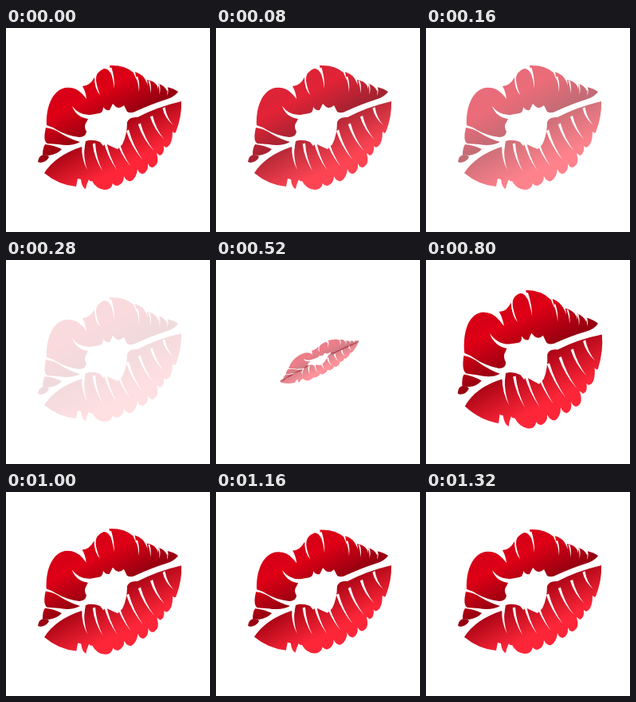
Animation of 256 by 256 pixels, one loop 1.92 s. Source, as an HTML page:

```html
<!DOCTYPE html>
<html lang="en">
<head>
<meta charset="utf-8">
<title>Kiss</title>
<style>
  html, body { margin: 0; width: 100%; height: 100%; overflow: hidden; background: #fff; }
  svg { display: block; width: 100vw; height: 100vh; }
  .cut { fill: #fff; }
</style>
</head>
<body>
<svg viewBox="0 0 256 256">
  <defs>
    <linearGradient id="top" gradientUnits="userSpaceOnUse" x1="128" y1="123" x2="103" y2="75">
      <stop offset="0" stop-color="#960010"/>
      <stop offset=".8" stop-color="#e00016"/>
      <stop offset="1" stop-color="#d80016"/>
    </linearGradient>
    <linearGradient id="low" gradientUnits="userSpaceOnUse" x1="130" y1="126" x2="153" y2="170">
      <stop offset="0" stop-color="#a80414"/>
      <stop offset="1" stop-color="#fc2638"/>
    </linearGradient>
  </defs>
  <g id="mark">
    <g id="lower">
      <path fill="url(#low)" d="M48 182Q62 160 95 149L98 153L100 142Q108 139 118 143L122 148L125 145L133 149L140 152L146 146
        Q152 134 152 118Q155 111 165 112Q190 99 220 92Q221 110 213 131Q211 133 209 130Q209 145 203 149Q200 151 198 148
        Q199 158 193 160L189 157Q193 170 186 174Q181 177 178 170Q179 180 172 183Q167 183 165 177Q164 188 157 192
        Q151 193 148 186Q148 195 140 198Q136 198 134 195Q132 203 124 203Q113 202 108 192Q105 193 104 190
        Q101 196 100 202Q95 200 94 190L90 189L88 199Q66 197 48 182Z"/>
    </g>
    <g id="upper" fill="url(#top)">
      <path d="M51 122C50 101 57 79 74 75Q87 73 96 83L101 89Q100 80 96 73Q105 73 111 62Q111 76 118 84Q114 74 113 66
        Q112 55 123 51Q128 50 132 58L130 47Q149 46 160 56L164 66L162 55Q172 58 176 67L178 72L177 65Q186 66 190 73
        L191 77L191 70Q199 72 202 79L202 74Q211 76 216 80Q211 87 200 90Q184 95 164 104Q157 108 152 105L148 97
        Q143 102 138 99L134 95L130 103Q125 104 122 99Q122 106 117 107L106 109Q92 110 83 98Q88 112 103 114L101 118
        Q97 123 101 130Q100 137 92 137Q76 135 64 128Q58 124 51 122Z"/>
      <path d="M50 125Q60 126 70 133Q82 140 93 143Q82 149 66 146L52 145Q46 142 50 125Z"/>
      <path d="M49 146Q60 147 70 152Q65 158 54 160L46 159Q46 150 49 146Z"/>
      <path d="M40 168Q41 160 47 159Q53 159 54 162Q51 168 43 169Z"/>
    </g>
  </g>
</svg>
<script>
const LOOP = 1920, STEP = 40, TILT = -27.4;
const FADE = 280, POP = 480, PEAK = 760, REST = 1320;
const $ = id => document.getElementById(id);
const clamp = v => Math.min(1, Math.max(0, v));
const mix = (a, b, p) => a + (b - a) * p;
const bend = (a, b, c, p) => mix(mix(a, b, p), mix(b, c, p), p);

// White crease, open at (x, y) and tapering to (tx, ty)
function crease(parent, x, y, tx, ty, w, sag) {
  const dx = tx - x, dy = ty - y, len = Math.hypot(dx, dy);
  const nx = -dy / len, ny = dx / len;
  const side = s => `${x + dx / 2 + nx * (sag + s)} ${y + dy / 2 + ny * (sag + s)}`;
  const path = document.createElementNS("http://www.w3.org/2000/svg", "path");
  path.setAttribute("class", "cut");
  path.setAttribute("d", `M${x + nx * w / 2} ${y + ny * w / 2}Q${side(w / 3)} ${tx} ${ty}` +
    `Q${side(-w / 3)} ${x - nx * w / 2} ${y - ny * w / 2}Z`);
  parent.append(path);
}

for (let i = 0; i < 5; i++) {
  const p = (i / 4) ** .55, x = mix(131, 202, p), y = mix(50, 74, p);
  crease($("upper"), x, y, x + mix(5, 0, p), y + mix(26, 11, p), mix(3, 1.6, p), -2);
}
for (let i = 0; i < 8; i++) {
  const p = i / 7;
  crease($("lower"), bend(97, 143, 198, p), bend(148, 140, 100, p),
    bend(102, 172, 210, p), bend(178, 190, 122, p), 3.5, 4);
}

// Height grows steadily past full size, then rings down
function height(t) {
  if (t < POP || t >= REST) return 1;
  if (t < PEAK) return mix(.1, 1.3, (t - POP) / (PEAK - POP));
  const s = t - PEAK;
  return 1 + .3 * Math.exp(-s / 130) * Math.cos(Math.PI * s / 150);
}

function draw(now) {
  const t = Math.floor(now % LOOP / STEP) * STEP;
  const grow = t < POP ? 1 : clamp((t - POP) / (PEAK - POP));
  const along = mix(.45, 1, Math.sin(grow * Math.PI / 2));
  const across = height(t);
  const alpha = t < POP ? clamp((320 - t) / FADE) : clamp((t - POP) / 80);
  $("mark").setAttribute("transform",
    `translate(130 126) rotate(${TILT}) scale(${along} ${across}) rotate(${-TILT}) translate(-130 -126)`);
  const close = Math.max(0, 1 - across) * 9;
  for (const [id, dir] of [["upper", 1], ["lower", -1]]) {
    $(id).setAttribute("transform", `translate(${dir * close * .46} ${dir * close * .89})`);
    $(id).setAttribute("opacity", alpha);
  }
}

const start = performance.now();
function tick() {
  draw(performance.now() - start);
  requestAnimationFrame(tick);
}
tick();
</script>
</body>
</html>
```
